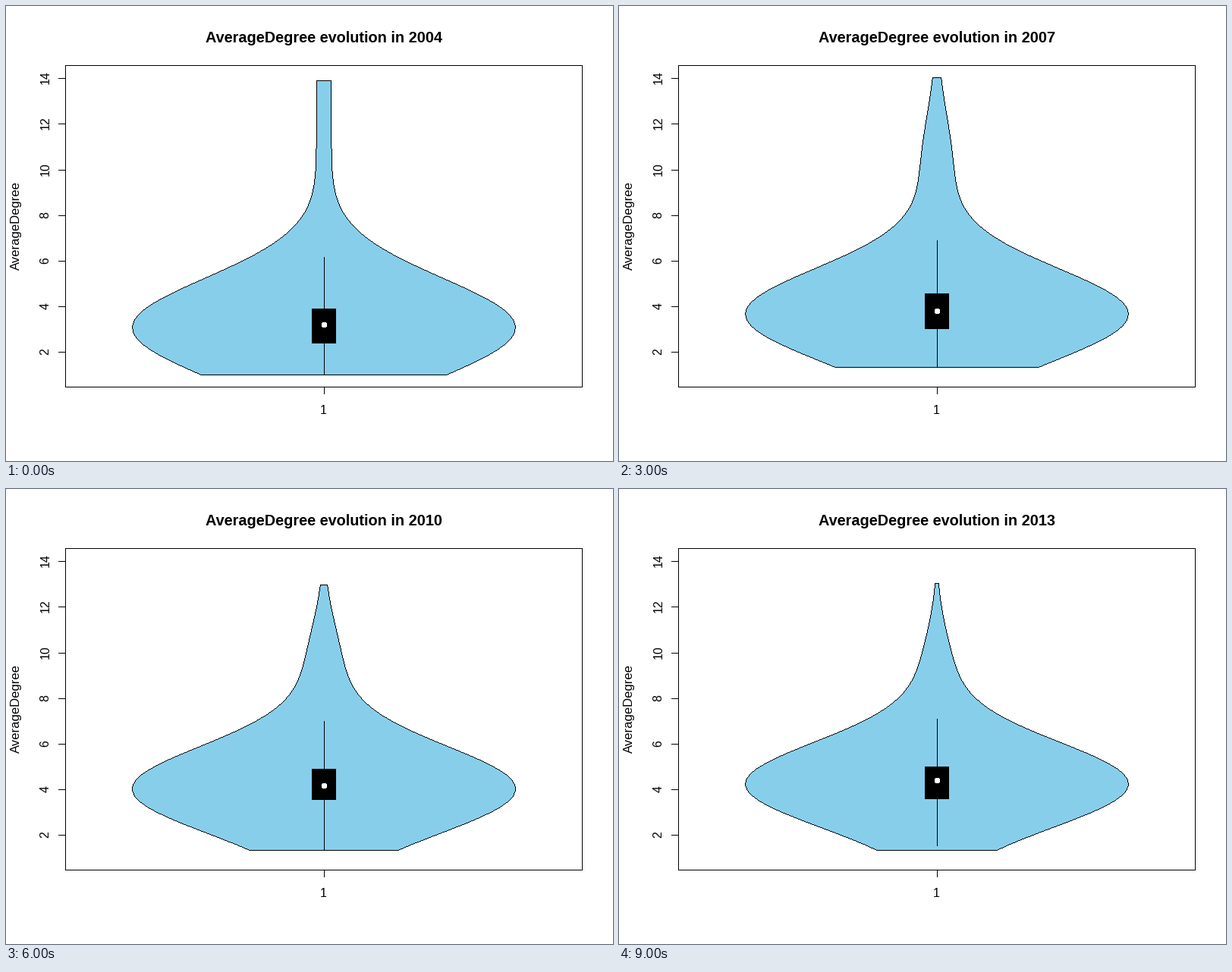
Write a matplotlib script that moves like this. It is 800x600 px and loops after 10000 ms.

```python
import numpy as np
import matplotlib.pyplot as plt
from matplotlib.animation import FuncAnimation
from matplotlib.patches import Circle, Rectangle

W, H, DPI = 800, 600, 100
PX = 72 / DPI
MID, HALF = 419, 252.5
GRID = 50
WHITE, BLACK, SKY = (255, 255, 255), (0, 0, 0), (135, 206, 235)

plt.rcParams["font.family"] = "Liberation Sans"


def bell(y, center, spread):
    return np.exp(-0.5 * ((y - center) / spread) ** 2)


def density(t):
    """Peak row and the two bells (height, row, spread) after t years."""
    if t < 2:
        peak = 424 - 4.5 * t
        return peak, (HALF, peak, 66 - 5.5 * t), (10, 140 + 40 * t, 200)
    peak = max(389, 417.2 - 3.6 * t)
    fade = np.exp(-(t - 2) / 3)
    tail = (22.5 - 0.3 * (t - 5.5) ** 2,
            243 - 43 * np.exp(-(t - 2) / 2), 55 + 30 * fade)
    return peak, (HALF, peak, 56.5 + 8 * fade), tail


def quartiles(t):
    if t < 2:
        return 399 - 3 * t, 445 - 8 * t
    return (365.7 + 21.3 * np.exp(-(t - 2) / 2),
            409 + 18.2 / (1 + np.exp(1.7 * (t - 4.4))))


def violin(bells, top, base):
    """Filled body with a hard outline one pixel wide."""
    grid = np.linspace(top, base, GRID)
    width = sum(a * bell(grid, c, s) for a, c, s in bells)
    width *= HALF / width.max()

    y, x = np.mgrid[:H, :W]
    w = np.interp(y, grid, width)
    body = ((x >= np.floor(MID - w)) & (x <= np.floor(MID + w))
            & (y >= round(top)) & (y <= round(base)))
    core = body.copy()
    for axis in (0, 1):
        for step in (-1, 1):
            core &= np.roll(body, step, axis)

    image = np.full((H, W, 3), WHITE, np.uint8)
    image[body] = BLACK
    image[core] = SKY
    return image


fig = plt.figure(figsize=(W / DPI, H / DPI), dpi=DPI, facecolor="white")
ax = fig.add_axes([0, 0, 1, 1])
ax.axis("off")
body = ax.imshow(np.full((H, W, 3), 255, np.uint8), extent=(0, W, H, 0),
                 aspect="auto", interpolation="nearest", zorder=1)
ax.set(xlim=(0, W), ylim=(H, 0))


def stroke(xs, ys):
    return ax.plot(np.array(xs) + 0.5, np.array(ys) + 0.5, color="black", lw=PX,
                   aa=False, snap=False, solid_capstyle="projecting",
                   solid_joinstyle="miter", zorder=3)[0]


def label(x, y, text, size, turn=0, weight="normal"):
    return ax.text(x, y, text, fontsize=size * PX, rotation=turn, weight=weight,
                   ha="center", va="baseline", rotation_mode="anchor")


stroke([78, 759, 759, 78, 78], [78, 78, 502, 502, 78])
for v in range(2, 15, 2):
    y = round(516.6 - 30.1 * v)
    stroke([69, 78], [y, y])
    label(56.5, y - 0.5, str(v), 16, 90)
stroke([419, 419], [502, 511])
label(418.5, 537.5, "1", 16)
label(18, 289.5, "AverageDegree", 16.6, 90)
title = label(419, 48, "", 19.85, weight="bold")

whisker = stroke([419, 419], [0, 1])
box = ax.add_patch(Rectangle((403, 0), 32, 1, fc="black", lw=0, aa=False, zorder=4))
dot = ax.add_patch(Circle((419.5, 0), 3.4, fc="white", lw=0, aa=False, zorder=5))


def draw(t):
    peak, *bells = density(t)
    q3, q1 = (round(q) for q in quartiles(t))
    top = np.interp(t, [1, 2, 3, 5, 9], [98, 94, 94, 127, 124])
    base = 486 if t < 2 else 476
    high = np.interp(t, [0, 1, 2, 3, 5, 7], [331, 336, 328, 309, 309, 303])
    low = base - 2 * max(0, t - 6)

    body.set_data(violin(bells, top, base))
    whisker.set_ydata([high + 0.5, low + 0.5])
    box.set_y(q3)
    box.set_height(q1 - q3)
    dot.center = (419.5, round(peak - 4.5) + 0.5)
    title.set_text(f"AverageDegree evolution in {2004 + t}")
    return body, whisker, box, dot, title


anim = FuncAnimation(fig, draw, frames=10, interval=1000, repeat=True, repeat_delay=0)
plt.show()
```
